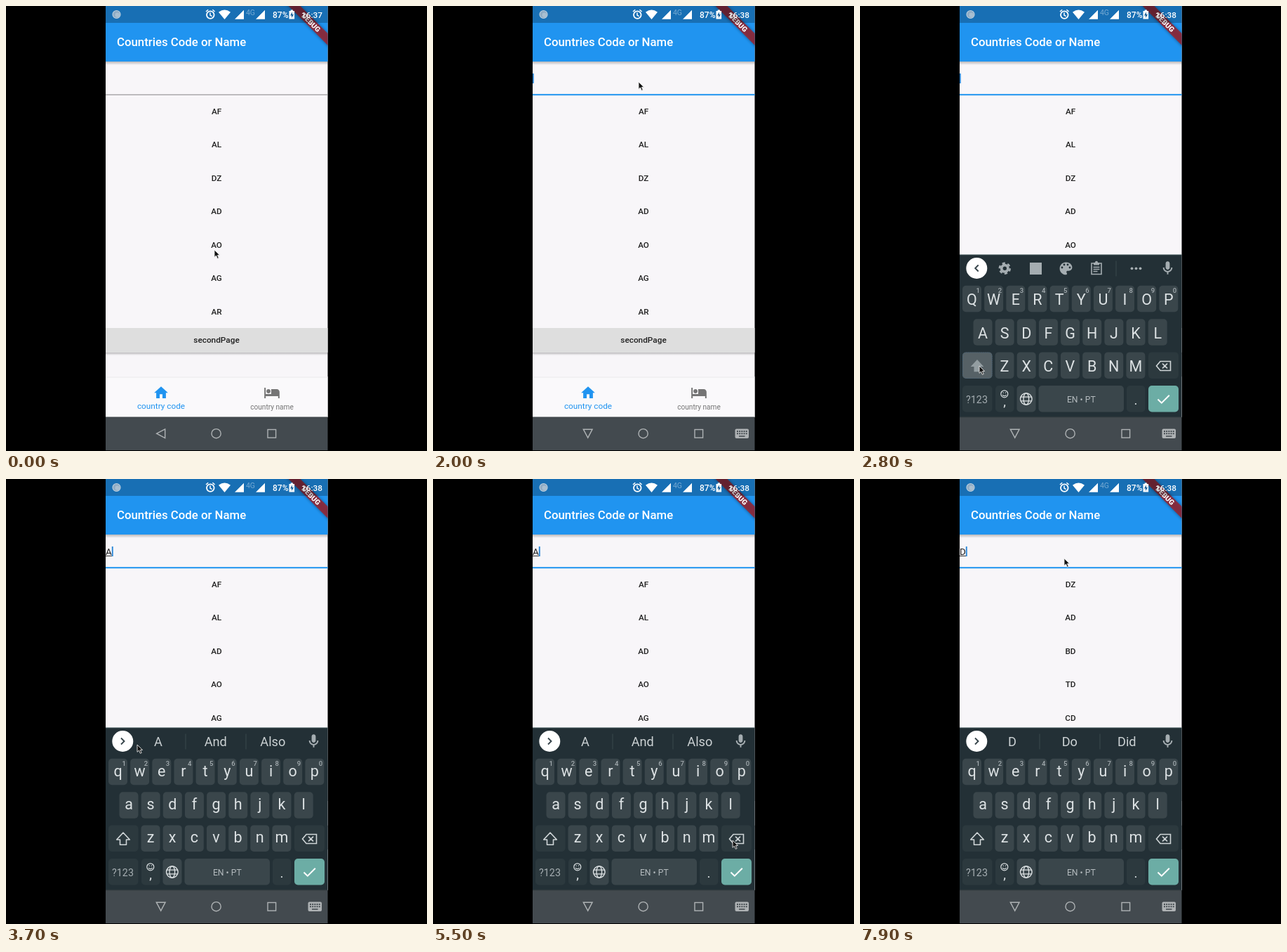
An HTML page for the animation above (8000 ms loop, 600 px wide and 633 px high).

```html
<!DOCTYPE html>
<html lang="en">
<head>
<meta charset="utf-8">
<title>Country code search</title>
<style>
  html, body { margin: 0; width: 100%; height: 100%; overflow: hidden; background: #000; }
  svg { display: block; width: 600px; height: 633px; }
  text { font-family: Roboto, "Liberation Sans", sans-serif; white-space: pre; }
  .soft { filter: blur(2px); }
</style>
</head>
<body>
<svg id="stage" viewBox="0 0 600 633">
  <defs>
    <clipPath id="phone"><rect x="142" y="0" width="316.5" height="632"/></clipPath>
    <clipPath id="screen"><rect x="142" y="0" width="316.5" height="585"/></clipPath>
    <linearGradient id="shade" x2="0" y2="1">
      <stop offset="0" stop-opacity=".3"/><stop offset="1" stop-opacity="0"/>
    </linearGradient>
  </defs>
</svg>
<script>
const LOOP = 8000;
const stage = document.getElementById('stage');
const BLUE = '#2094f0';

function el(parent, name, attrs = {}) {
  const node = document.createElementNS('http://www.w3.org/2000/svg', name);
  for (const key in attrs) node.setAttribute(key, attrs[key]);
  parent.appendChild(node);
  return node;
}
const group = (p, attrs) => el(p, 'g', attrs);
const rect = (p, x, y, width, height, fill, more) => el(p, 'rect', { x, y, width, height, fill, ...more });
const circle = (p, cx, cy, r, more) => el(p, 'circle', { cx, cy, r, ...more });
const path = (p, d, more) => el(p, 'path', { d, ...more });
const line = (p, d, stroke, width = 1.5, more) =>
  path(p, d, { fill: 'none', stroke, 'stroke-width': width, ...more });
function text(p, str, x, y, size, fill, more) {
  const node = el(p, 'text', { x, y, 'font-size': size, fill, 'text-anchor': 'middle', ...more });
  node.textContent = str;
  return node;
}
// Icon drawn on a 24-unit grid, centred at x, y
const icon = (p, d, x, y, scale, fill) =>
  path(p, d, { fill, transform: `translate(${x} ${y}) scale(${scale}) translate(-12 -12)` });
const show = (node, on) => node.setAttribute('visibility', on ? 'inherit' : 'hidden');
const medium = { 'font-weight': 500 };
const left = { 'text-anchor': 'start' };

const ICONS = {
  home: 'M10 20v-6h4v6h5v-8h3L12 3 2 12h3v8z',
  bed: 'M7 13c1.66 0 3-1.34 3-3S8.66 7 7 7s-3 1.34-3 3 1.34 3 3 3zm12-6h-8v7H3V5H1v15h2v-3h18v3h2v-9c0-2.21-1.79-4-4-4z',
  mic: 'M12 14c1.66 0 3-1.34 3-3V5c0-1.66-1.34-3-3-3S9 3.34 9 5v6c0 1.66 1.34 3 3 3zm5-3c0 2.76-2.24 5-5 5s-5-2.24-5-5H5c0 3.53 2.61 6.43 6 6.92V21h2v-3.08c3.39-.49 6-3.39 6-6.92h-2z'
};

const phone = group(stage, { 'clip-path': 'url(#phone)' });
const screen = group(phone, { 'clip-path': 'url(#screen)' });

// Page
rect(screen, 142, 0, 317, 585, '#f8f6f9');
const rows = [0, 1, 2, 3, 4, 5, 6].map(i => text(screen, '', 300, 154 + 47.45 * i, 11.7, '#212121', medium));
rect(screen, 142, 492, 317, 5, 'url(#shade)');
rect(screen, 142, 458, 317, 35, '#dedede');
text(screen, 'secondPage', 300, 478.8, 11.8, '#212121', medium);

const underline = rect(screen, 142, 125.7, 317, 1, '#858386');
const field = text(screen, '', 142, 108, 13.4, '#222', left);
const compose = rect(screen, 142, 109, 9, 1, '#333');
const caret = rect(screen, 142, 96, 1.9, 14, '#2a86d6');

// Tabs
rect(screen, 142, 527, 317, 2, '#f2f0f3');
rect(screen, 142, 529, 317, 56, '#faf9fb');
icon(screen, ICONS.home, 221, 550.2, .985, BLUE);
text(screen, 'country code', 221, 573, 11.8, BLUE);
icon(screen, ICONS.bed, 379, 550, .985, '#757575');
text(screen, 'country name', 379, 573.5, 10.1, '#757575');

// App bar with corner ribbon
rect(screen, 142, 78, 317, 6, 'url(#shade)');
rect(screen, 142, 0, 317, 79, BLUE);
text(screen, 'Countries Code or Name', 158, 57.3, 16.8, '#fff', { ...medium, ...left });
const ribbon = group(screen, { transform: 'translate(458.5 0) rotate(45)' });
rect(ribbon, -60, 27.6, 120, 12, '#000', { opacity: .4, class: 'soft' });
rect(ribbon, -60, 27.6, 120, 11.8, '#a0202a', { opacity: .8 });
text(ribbon, 'DEBUG', 0, 37.1, 10.2, '#fff', { 'font-weight': 900 });

// Status bar
rect(screen, 142, 0, 317, 24, '#000', { opacity: .25 });
circle(screen, 157.5, 12, 5.5, { fill: '#8fabc4', stroke: '#b9cede', 'stroke-width': 1.2 });
circle(screen, 158.7, 12.8, 3.2, { fill: '#a9bfd1' });
circle(screen, 291.3, 12.6, 5.3, { fill: 'none', stroke: '#fff', 'stroke-width': 1.8 });
line(screen, 'M291 9.5v3.6l2.6 1.6M285 8l3.2-2.7M297.6 8l-3.2-2.7', '#fff', 1.5);
path(screen, 'M303 8.7Q311.5 2.3 320 8.7L311.5 19z', { fill: '#fff' });
path(screen, 'M326 18.7h13v-13zM356 18.7h13v-13z', { fill: '#fff' });
text(screen, '4G', 348.5, 13, 10.5, '#fff', { opacity: .4 });
text(screen, '87%', 380, 16.8, 12, '#fff', { ...medium, ...left });
path(screen, 'M403.5 7h2.2v-1.6h3.2V7h2.2v11.5h-7.6z', { fill: '#fff' });
path(screen, 'M408 8.5l-3 5h2v3.5l3-5h-2z', { fill: '#1a5f98' });
const clock = text(screen, '', 421, 16.8, 11.8, '#fff', { ...medium, ...left });

// Keyboard
const board = group(screen);
const KEY = '#3a464b', DARK = '#2c393e', INK = '#dde2e4', DIM = '#a5adb1';
rect(board, 142, 354, 317, 232, '#233036');
rect(board, 142, 353.5, 317, 1, '#3d5254');
const key = (x, y, w, fill) => rect(board, x, y, w, 37.5, fill, { rx: 5 });

const letters = [];
function letterRow(chars, x0, y, hints) {
  [...chars].forEach((ch, i) => {
    const x = x0 + 31.15 * i;
    key(x - 13.5, y, 27, KEY);
    letters.push({ ch, y, node: text(board, ch, x, y, 21.5, INK) });
    if (hints) text(board, (i + 1) % 10, x + 8.7, y + 10, 9.5, DIM, medium);
  });
}
letterRow('qwertyuiop', 159.5, 397.7, true);
letterRow('asdfghjkl', 175, 445.2);
const shiftKey = key(146, 492.4, 42.5, DARK);
const shiftRing = rect(board, 146.5, 493, 41.5, 36.5, 'none',
  { rx: 5, stroke: '#42637f', 'stroke-dasharray': '1 2' });
letterRow('zxcvbnm', 206, 492.4);
const shift = path(board, 'M167 503l9.3 10h-4.8v7.2h-9v-7.2h-4.8z', { 'stroke-linejoin': 'round', 'stroke-width': 1.6 });

key(411, 492.4, 43, DARK);
line(board, 'M428 505.5h14.5v13H428l-5.5-6.5zM431 508.7l7 6.6M438 508.7l-7 6.6', '#cfd5d7', 1.6);

key(146, 540, 42.5, DARK);
text(board, '?123', 166.5, 564.8, 14.3, DIM);
key(193, 540, 26.5, DARK);
circle(board, 205.8, 551.8, 5, { fill: 'none', stroke: INK, 'stroke-width': 1.2 });
line(board, 'M203 553.2q2.8 3 5.6 0M203.6 550.2h1.2M206.9 550.2h1.2', INK, 1.2);
text(board, ',', 206, 568.5, 19, INK);
key(223.5, 540, 27, KEY);
circle(board, 236.8, 559, 8.3, { fill: 'none', stroke: INK, 'stroke-width': 1.4 });
el(board, 'ellipse', { cx: 236.8, cy: 559, rx: 3.8, ry: 8.3, fill: 'none', stroke: INK, 'stroke-width': 1.3 });
line(board, 'M229 556.2h15.6M229 561.8h15.6', INK, 1.3);
key(254.5, 540, 121.5, KEY);
text(board, 'EN • PT', 315.3, 563.8, 12.2, '#b3babd');
key(380, 540, 26.5, DARK);
text(board, '.', 393, 566.5, 19, INK);
key(411, 540, 43, '#6cada5');
line(board, 'M424.5 559.5l5.3 5.2 11-11', '#fff', 2);

// Strip above the keys
circle(board, 166.3, 373, 15, { fill: '#fff' });
const chevron = line(board, '', '#37454b', 1.9);
icon(board, ICONS.mic, 438.5, 373, .97, DIM);
const tools = group(board);
circle(tools, 206.3, 373.3, 4.6, { fill: 'none', stroke: DIM, 'stroke-width': 3.8 });
circle(tools, 206.3, 373.3, 7.4, { fill: 'none', stroke: DIM, 'stroke-width': 2.6, 'stroke-dasharray': '4.2 3.55' });
rect(tools, 242, 365, 17, 17, DIM);
path(tools, 'M293.5 364.5c-4.9 0-8.9 4-8.9 8.9s4 8.9 8.9 8.9c1 0 1.6-.8 1.5-1.6 0-1.2-.9-1.5-.8-2.5 0-.9.7-1.5 1.5-1.5h1.8c2.8 0 4.9-2.2 4.9-4.9 0-4.2-4-7.3-8.9-7.3z', { fill: DIM });
for (const [x, y] of [[288, 372], [291, 368], [296, 368], [299, 372]])
  circle(tools, x, y, 1.4, { fill: '#233036' });
line(tools, 'M330 366h14v15.5h-14zM332.5 371.5h9M332.5 374.5h9M332.5 377.5h6', DIM, 1.6);
path(tools, 'M333 365h8v3.5h-8z', { fill: DIM });
circle(tools, 337, 364.8, 2, { fill: DIM });
line(tools, 'M365 362.5v22', '#3b484d', 1);
for (const x of [387.5, 393.5, 399.5]) circle(tools, x, 373.3, 1.9, { fill: DIM });

const hints = group(board);
const words = [217, 298.8, 380.3].map(x => text(hints, '', x, 380, 18.2, '#ccd2d4'));
line(hints, 'M256 362.5v22M342 362.5v22', '#3b484d', 1);

// System navigation
const NAV = '#aeb2b4';
rect(phone, 142, 585, 317, 47, '#434a4f');
rect(phone, 142, 584.5, 317, 1, '#3a4145');
const back = line(phone, 'M214.7 608.2l12-6.4v12.8z', NAV, 1.4);
circle(phone, 299.6, 608.2, 6.6, { fill: 'none', stroke: NAV, 'stroke-width': 1.4 });
rect(phone, 373, 602.5, 11.6, 11.6, 'none', { stroke: NAV, 'stroke-width': 1.4 });
const typeIcon = group(phone);
rect(typeIcon, 430.5, 601.5, 19.5, 13.5, NAV, { rx: 2 });
for (const y of [605, 608.3])
  line(typeIcon, `M433 ${y}h15`, '#434a4f', 1.9, { 'stroke-dasharray': '1.9 1.3' });
line(typeIcon, 'M436 612h8.5', '#434a4f', 1.6);

// Pointer
const pointer = path(stage, 'M0 0v10.3l2.5-2.2 1.8 4.2 1.9-.8-1.8-4.1h3.2z',
  { fill: '#111', stroke: '#e8e8e8', 'stroke-width': .9 });

// Timing, in ms
const CLOCK = 1000, FOCUS = 1700, TURN = 1750, RISE = 2030;
const ALL = 'AF AL DZ AD AO AG AR';
const states = [
  { at: 0, value: '', list: ALL, words: '' },
  { at: 3250, value: 'A', list: 'AF AL AD AO AG', words: 'A And Also' },
  { at: 5850, value: '', list: ALL, words: '' },
  { at: 6800, value: 'D', list: 'DZ AD BD TD CD', words: 'D Do Did' }
];
const track = [
  [0, 297, 347], [700, 297, 347], [1500, 293, 108], [2100, 293, 108], [2700, 170, 512],
  [2850, 170, 512], [3150, 176, 466], [3400, 177, 462], [3700, 187, 378], [4300, 292, 200],
  [4700, 292, 200], [5300, 427, 514], [5950, 427, 514], [6450, 228, 473], [6900, 230, 471],
  [7700, 291, 113], [8000, 291, 113]
];
const clamp = v => Math.max(0, Math.min(1, v));
const smooth = v => v * v * (3 - 2 * v);

function pointerAt(t) {
  const i = track.findIndex(p => p[0] > t);
  const [t0, x0, y0] = track[i - 1], [t1, x1, y1] = track[i];
  const k = smooth((t - t0) / (t1 - t0));
  return [x0 + (x1 - x0) * k, y0 + (y1 - y0) * k];
}

let current = null;
function setState(s) {
  if (s === current) return;
  current = s;
  const codes = s.list.split(' '), picks = s.words.split(' ');
  rows.forEach((r, i) => r.textContent = codes[i] || '');
  words.forEach((w, i) => w.textContent = picks[i] || '');
  field.textContent = s.value;
  const typed = s.value !== '';
  show(compose, typed);
  show(hints, typed);
  show(tools, !typed);
  chevron.setAttribute('d', typed ? 'M164 368.5l4.5 4.5-4.5 4.5' : 'M168.7 368.5l-4.5 4.5 4.5 4.5');
  for (const { ch, y, node } of letters) {
    node.textContent = typed ? ch : ch.toUpperCase();
    node.setAttribute('y', y + (typed ? 25 : 27.3));
  }
  shift.setAttribute('fill', typed ? 'none' : '#939da1');
  shift.setAttribute('stroke', typed ? '#cfd5d7' : 'none');
  caret.setAttribute('x', typed ? 150.8 : 141.8);
}

function render(t) {
  const state = states.filter(s => s.at <= t).pop();
  setState(state);
  clock.textContent = t < CLOCK ? '16:37' : '16:38';

  const focused = t >= FOCUS;
  underline.setAttribute('fill', focused ? BLUE : '#858386');
  underline.setAttribute('height', focused ? 2 : 1);
  underline.setAttribute('y', focused ? 125.2 : 125.7);
  const sinceKey = t - Math.max(FOCUS, state.at);
  show(caret, focused && sinceKey % 1000 < 500);

  const turn = clamp((t - TURN) / 150);
  back.setAttribute('transform', `rotate(${-90 * turn} 220.7 608.2)`);
  show(typeIcon, t >= TURN);

  const rise = 1 - (1 - clamp((t - RISE) / 280)) ** 3;
  show(board, rise > 0);
  board.setAttribute('transform', `translate(0 ${232 * (1 - rise)})`);
  const held = t >= 2700 && t < 2920;
  shiftKey.setAttribute('fill', held ? '#566166' : DARK);
  show(shiftRing, held);

  const [x, y] = pointerAt(t);
  pointer.setAttribute('transform', `translate(${x} ${y})`);
}

const start = performance.now();
function tick() {
  render((performance.now() - start) % LOOP);
  requestAnimationFrame(tick);
}
tick();
</script>
</body>
</html>
```
